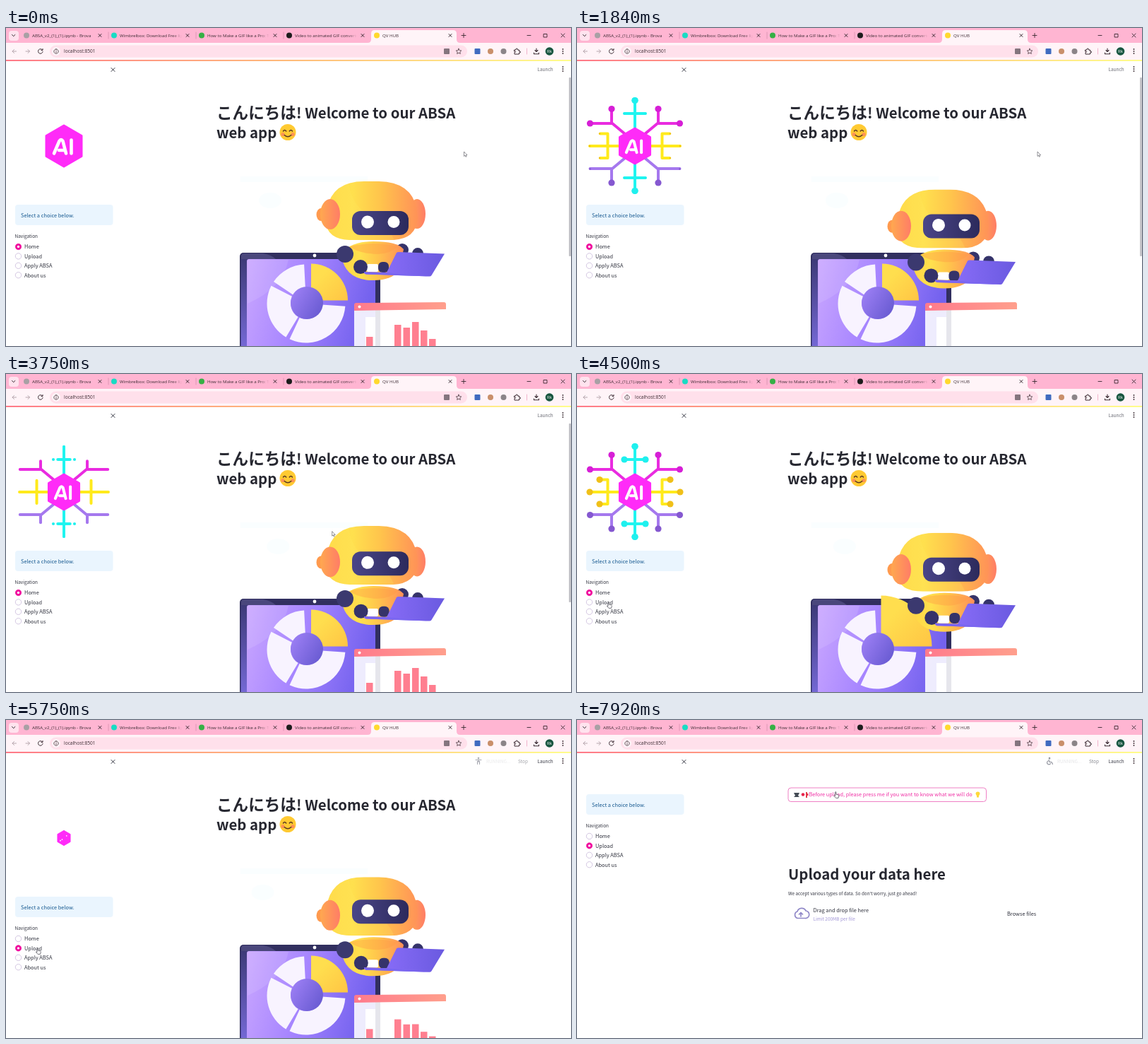
An HTML page that plays this animation: 800 by 450 pixels, repeating every 8000 ms.

```html
<!DOCTYPE html>
<html lang="en">
<head>
<meta charset="utf-8">
<title>Web app demo</title>
<style>
html, body { margin: 0; width: 100%; height: 100%; overflow: hidden; background: #fff; }
svg { display: block; width: 100vw; height: 100vh; }
.app { font: 7.4px "Noto Sans CJK JP", "Noto Sans CJK", "Noto Sans", sans-serif; fill: #31333f; }
.small { font-size: 6.45px; }
.h1 { font-size: 20.4px; font-weight: 700; fill: #262730; }
.ui { font: 6.15px "Open Sans", "Noto Sans", sans-serif; fill: #3a2b33; }
.line { fill: none; stroke-linecap: round; stroke-linejoin: round; }
</style>
</head>
<body>
<svg viewBox="0 0 800 450" xmlns="http://www.w3.org/2000/svg">
  <defs>
    <linearGradient id="rainbow"><stop stop-color="#ff6c7c"/><stop offset=".5" stop-color="#ffb46c"/><stop offset="1" stop-color="#fffd80"/></linearGradient>
    <linearGradient id="skin"><stop stop-color="#ffd644"/><stop offset=".3" stop-color="#ffe04e"/><stop offset=".58" stop-color="#ffc54c"/><stop offset="1" stop-color="#ff8f58"/></linearGradient>
    <linearGradient id="ear"><stop stop-color="#ffa850"/><stop offset="1" stop-color="#ff7d66"/></linearGradient>
    <linearGradient id="visor"><stop stop-color="#4a4588"/><stop offset="1" stop-color="#2c2a5c"/></linearGradient>
    <linearGradient id="bezel" x2="0" y2="1"><stop stop-color="#3d3a78"/><stop offset="1" stop-color="#7569d6"/></linearGradient>
    <linearGradient id="screen" x2="1" y2=".2"><stop stop-color="#c9a6ff"/><stop offset=".5" stop-color="#a584ff"/><stop offset="1" stop-color="#7462ee"/></linearGradient>
    <linearGradient id="slice" x2="1" y2="1"><stop offset=".3" stop-color="#ffde4e"/><stop offset="1" stop-color="#ffc544"/></linearGradient>
    <linearGradient id="lid"><stop stop-color="#9272ff"/><stop offset="1" stop-color="#6a5ae0"/></linearGradient>
    <linearGradient id="hub" x2="1" y2=".6"><stop stop-color="#a283f8"/><stop offset="1" stop-color="#6c5dd4"/></linearGradient>
    <linearGradient id="pink"><stop stop-color="#ff7a8c"/><stop offset="1" stop-color="#ff9f8c"/></linearGradient>
    <linearGradient id="fade"><stop stop-color="#ffb5d2" stop-opacity="0"/><stop offset="1" stop-color="#ffb5d2"/></linearGradient>
    <clipPath id="headClip"><path d="M453 275Q452 217 507 217H528Q582 218 583 270Q580 300 545 300H490Q455 300 453 275Z"/></clipPath>
  </defs>
  <rect width="800" height="450" fill="#fff"/>

  <g id="home">
    <text class="app h1" x="298" y="128"><tspan font-size="22.6">こんにちは</tspan>! Welcome to our ABSA</text>
    <text class="app h1" x="298" y="155.800">web app</text>
    <g transform="translate(399 147.500)">
      <circle r="11.500" fill="#ffca32"/>
      <circle cx="-7" cy="3" r="2.600" fill="#ff9256"/><circle cx="7" cy="3" r="2.600" fill="#ff9256"/>
      <path class="line" d="M-6.500-1.500q2-3 4.200 0M2.300-1.500q2.100-3 4.200 0M-4.800 4q4.800 4.600 9.600 0" stroke="#5b3a24" stroke-width="1.500"/>
    </g>
    <rect x="332" y="210" width="180" height="8" fill="#fafeff"/>
    <ellipse id="haze" cx="360" cy="250" rx="16" ry="11" fill="#fafeff"/>

    <rect x="331" y="318" width="199" height="150" rx="5" fill="#312f5f"/>
    <rect x="332.500" y="327" width="9" height="125" fill="url(#bezel)"/>
    <path d="M333 327v-4q0-4 4-4h27q12 2 18 8z" fill="#4a477c"/>
    <rect x="341" y="327" width="182" height="140" rx="3" fill="url(#screen)"/>
    <path d="M342 328h58q-8 40-58 62z" fill="#fff" opacity=".1"/>
    <circle cx="437" cy="322" r="2.400" fill="#fff"/>
    <g id="ring" fill="#f8f3ff"></g>
    <path id="wedge" fill="url(#slice)"/>
    <circle cx="426" cy="389" r="23" fill="url(#hub)"/>

    <g id="body">
      <circle cx="561" cy="314" r="9" fill="#35336a"/><circle cx="583" cy="319" r="8" fill="#35336a"/>
      <path d="M475 322Q484 302 520 302Q554 302 563 313L557 343Q546 357 520 357Q480 357 475 322Z" fill="url(#skin)"/>
      <path d="M487 309q30-8 68 0q-14 14-40 10q-20-2-28-10z" fill="#ff9a44" opacity=".4"/>
      <rect x="511" y="334" width="16" height="11" rx="2" fill="#fff"/>
      <circle cx="480" cy="320" r="12" fill="#3b396f"/>
      <g id="hands" fill="#35336a"><circle cx="502" cy="338" r="10"/><rect x="527" y="331" width="15" height="15" rx="6"/></g>
      <path d="M507 345l32 1 14-28q1-1 3-1l65 2.500-18.500 30.500q-1 1.500-3 1.500l-90-3q-3-1-2.500-3z" fill="url(#lid)"/>
      <path d="M539 346l61 5.500-90-3q-3-1-3-3.500z" fill="#7a66f0"/>
    </g>
    <g id="ears"><ellipse cx="582" cy="263" rx="12" ry="21" fill="url(#ear)"/></g>
    <g id="head" clip-path="url(#headClip)">
      <rect x="450" y="215" width="136" height="88" fill="url(#skin)"/>
      <path d="M450 215h35q2 30 22 45q32 12 44 43h-101z" fill="#ffe860" opacity=".22"/>
    </g>
    <g id="face">
      <rect x="490" y="259" width="80" height="34" rx="12" fill="url(#visor)"/>
      <circle cx="512" cy="274.500" r="9" fill="#fff"/><circle cx="549" cy="274.500" r="8.500" fill="#fff"/>
    </g>
    <g id="earFront">
      <ellipse cx="446" cy="264" rx="6.500" ry="9" fill="#ff9a4e"/>
      <ellipse cx="459" cy="263.500" rx="14" ry="21.500" fill="url(#ear)"/>
    </g>

    <rect x="493" y="398" width="129" height="60" fill="#fff" opacity=".88"/>
    <rect x="509" y="409" width="14" height="50" fill="#fff"/>
    <path d="M493 392q0-3 3-3l124-1q3 0 3 3v7l-130 2z" fill="url(#pink)"/>
    <circle cx="500.500" cy="394.500" r="2" fill="#fff"/>
    <g id="bars"></g>
  </g>

  <g id="upload" class="app">
    <rect id="button" x="299" y="96" width="280.500" height="19.500" rx="4" fill="#fff" stroke-width=".9"/>
    <path d="M307 103h8l-2 4 2 2h-8l2-2z" fill="#444b55"/><circle cx="320" cy="105.500" r="2.300" fill="#e8234c"/>
    <path d="M324 102h2v2h1.500v3H326v3h-2z" fill="#e23b4a"/>
    <text id="buttonText" x="328.500" y="108.300">Before upload, please press me if you want to know what we will do</text>
    <path d="M564.500 104.500a3 3 0 1 1 6 0l-1.500 3v2h-3v-2z" fill="#ffd83a"/>
    <text class="h1" x="299" y="225.500">Upload your data here</text>
    <text x="299" y="248" font-size="6.300">We accept various types of data. So don't worry, just go ahead!</text>
    <path class="line" d="M312 280.500a5 5 0 0 1 0-9.500a6.500 6.500 0 0 1 12-1a5 5 0 0 1-1 10.500zM317 278v-5m-2.500 2l2.500-2.500 2.500 2.500" stroke="#9088c8" stroke-width="1.700"/>
    <text x="334.500" y="271.500">Drag and drop file here</text>
    <text class="small" x="334.500" y="284" fill="#a095d6">Limit 200MB per file</text>
    <text x="609" y="277">Browse files</text>
  </g>

  <g id="logo">
    <g id="half"></g>
    <use href="#half" transform="translate(164 0) scale(-1 1)"/>
    <g id="hex">
      <path d="M0-29L25-14.500V14.500L0 29L-25 14.500V-14.500Z" fill="#ff2bf8" stroke="#ff2bf8" stroke-width="3" stroke-linejoin="round"/>
      <g id="letters" class="line" stroke="#fff" stroke-width="4.600">
        <path pathLength="1" d="M-14 10.500L-6.500-7Q-4-11-1.500-7L3 10.500"/><path pathLength="1" d="M-7 6H0"/><path pathLength="1" d="M10.500-8.500V10.500"/>
      </g>
    </g>
  </g>

  <g id="side" class="app">
    <rect x="13" y="250" width="138.500" height="29" rx="4" fill="#eaf5fe"/>
    <text x="21" y="267.500" fill="#17598f">Select a choice below.</text>
    <text class="small" x="12.500" y="296.500">Navigation</text>
    <g id="nav"></g>
  </g>

  <path class="line" d="M149 56.500l5 5m0-5l-5 5" stroke="#31333f" stroke-width="1"/>
  <g id="status" class="app small">
    <g id="runner" class="line" stroke="#8b8d98" stroke-width="1.100"></g>
    <text x="680" y="60.500" opacity=".14">RUNNING...</text>
    <text x="725" y="60.500" opacity=".6">Stop</text>
  </g>
  <text id="launch" class="app small" x="752.500" y="60.500">Launch</text>
  <rect id="scroll" x="797" y="70" width="3" height="253" rx="1" fill="#c4c4c9"/>

  <g id="chrome" class="ui"></g>

  <path id="arrow" d="M0 0v6.500l1.500-1.300 1 2.200 1-.5-.9-2.100h2z" fill="#fff" stroke="#4c4c55" stroke-width=".6"/>
  <path id="hand" d="M-1.500 1.500v-5.500q.8-1 1.500 0v3.200l3 .7q1 .3.800 1.500l-.8 3h-3.500l-2.600-3q0-1.200 1.600.1z" fill="#fff" stroke="#3c3c46" stroke-width=".7"/>
</svg>
<script>
const LOOP = 8000, FPS = 12;
const $ = id => document.getElementById(id);
const clamp = v => Math.max(0, Math.min(1, v));
const ramp = (t, a, b) => clamp((t - a) / (b - a));
const ease = v => v * v * (3 - 2 * v);
const mod = (a, b) => ((a % b) + b) % b;
const show = (id, on) => $(id).setAttribute('display', on ? 'inline' : 'none');
const move = (id, x, y, rest = '') => $(id).setAttribute('transform', `translate(${x} ${y}) ${rest}`);

// Piecewise linear value through [time, value] points.
function keys(t, list) {
  let i = 1;
  while (i < list.length - 1 && t > list[i][0]) i++;
  const [a, va] = list[i - 1], [b, vb] = list[i];
  return va + (vb - va) * ramp(t, a, b);
}

function sector(cx, cy, r, from, to, inner = 0) {
  const at = (rad, deg) => {
    const a = deg * Math.PI / 180;
    return `${(cx + rad * Math.cos(a)).toFixed(2)} ${(cy + rad * Math.sin(a)).toFixed(2)}`;
  };
  return `M${at(inner, from)}L${at(r, from)}A${r} ${r} 0 0 1 ${at(r, to)}L${at(inner, to)}` +
    (inner ? `A${inner} ${inner} 0 0 0 ${at(inner, from)}` : '') + 'Z';
}

function buildChrome() {
  const stroke = (d, c = '#3a2b33', w = 1) => `<path class="line" d="${d}" stroke="${c}" stroke-width="${w}"/>`;
  const dots = (x, y) => [-3, 0, 3].map(d => `<circle cx="${x}" cy="${y + d}" r=".9"/>`).join('');
  const tabs = [
    ['ABSA_v2_(1)_(1).ipynb - Brova', '#a8a0a4'],
    ['Wimbrelbox: Download Free light', '#19dcc4'],
    ['How to Make a GIF like a Pro: Tips', '#35b045'],
    ['Video to animated GIF converter', '#1c1c1c'],
    ['QV HUB', '#ffd92e']
  ];
  let s = `<rect width="800" height="22" fill="#ffb5d2"/><rect y="21" width="800" height="24" fill="#fff4f8"/>
    <path d="M512 21q5 0 5-5V8q0-5 5-5h111q5 0 5 5v8q0 5 5 5z" fill="#fff4f8"/>
    <rect y="45" width="800" height="1.800" fill="url(#rainbow)"/>
    <rect x="4" y="4" width="14" height="14" rx="4" fill="#ffe3ee"/>` + stroke('M8.500 9.500l2.200 2.200 2.200-2.200');
  tabs.forEach(([name, color], i) => {
    const x = 25 + i * 124;
    s += `<circle cx="${x + 4}" cy="10.500" r="4" fill="${color}"/>
      <svg x="${x + 12}" y="0" width="88" height="21"><text y="12.800">${name}</text>
      ${i % 4 ? '<rect x="74" width="14" height="21" fill="url(#fade)"/>' : ''}</svg>` +
      stroke(`M${x + 106} 8.500l4 4m0-4l-4 4`);
    if (i < 3) s += stroke(`M${x + 120} 6v9`, '#d690ae', .8);
  });
  s += stroke('M645 10.500h6m-3-3v6M738 10.500h5M761.500 8.500h4.500v4.500h-4.500zM786 8l5 5m0-5l-5 5', '#3a2b33', .9);
  s += stroke('M14.500 33h-5.500m2.500-2.500l-2.500 2.500 2.500 2.500M28 33h5.500m-2.500-2.500l2.500 2.500-2.500 2.500', '#b5a5ac');
  s += stroke('M51.500 31a3.300 3.300 0 1 0 .6 2.500M52 29.500v2h-2');
  s += `<rect x="62" y="24.500" width="591" height="17" rx="8.500" fill="#ffe0eb"/>
    <circle cx="71" cy="33" r="6" fill="#fff4f8"/>` + stroke('M71 29.800a3.200 3.200 0 1 0 .01 0M71 33v1.500M71 31.500v.1', '#3a2b33', .8);
  s += `<text x="82" y="35.400" font-size="6.600">localhost:8501</text>
    <rect x="620" y="29" width="8" height="8" rx="1" fill="#84757e"/>`;
  s += stroke('M641 29.200l1.100 2.500 2.700.3-2 1.800.5 2.700-2.300-1.400-2.300 1.400.5-2.700-2-1.800 2.700-.3z', '#4a3a42', .8);
  s += `<rect x="663.500" y="29" width="8" height="8" rx="1" fill="#3f6bc0"/>
    <circle cx="686" cy="33" r="4" fill="#c98f6a"/><circle cx="704.500" cy="33" r="4" fill="#8b8488"/>`;
  s += stroke('M720 31h2q-.5-2 1.200-2t1.200 2h2.100v2q2-.4 2 1t-2 1v2H720v-2.500q1.600-.2 1.600-1T720 33z');
  s += stroke('M737.500 29v8', '#f0b3cb') + stroke('M751 29v4.500m-2-2l2 2 2-2M747.500 35v1.800h7V35', '#3a2b33', 1.100);
  s += `<circle cx="769.500" cy="33" r="5.800" fill="#17553f"/><text x="769.500" y="35" text-anchor="middle" style="fill:#fff">Rk</text>`;
  $('chrome').innerHTML = s + dots(788.500, 33) + dots(788.500, 58);
}

// Left half of the circuit: path, colour, branch
const wires = [
  ['M82 150V102', '#1ff5f0', 0], ['M82 121H67', '#1ff5f0', 1], ['M82 184V231', '#1ff5f0', 0], ['M82 212H67', '#1ff5f0', 1],
  ['M68 150L50 135H18.5', '#e92be0', 0], ['M49 134.5V115', '#e92be0', 1],
  ['M68 184L50 199H18.5', '#a578ee', 0], ['M49 199.5V218', '#a578ee', 1],
  ['M62 167H18', '#ffea1c', 0], ['M43.5 167V149.5H33', '#ffea1c', 1], ['M43.5 167V184H33', '#ffea1c', 1]
];
// Node discs: x, y, colour, start of growth, start of shrinking
const nodes = [
  [82, 102.5, '#1ff0ee', 1.35, 2.42], [67, 121, '#1ff0ee', 1.05, 2.2],
  [82, 230.5, '#1ff0ee', 1.35, 2.42], [67, 212, '#1ff0ee', 1.05, 2.2],
  [18.5, 135, '#d61fd6', 1.38, 2.42], [49, 114.5, '#d61fd6', 1.38, 2.42],
  [18.5, 199.5, '#8558d0', 1.45, 2.2], [49, 219, '#8558d0', 1.38, 2.42],
  [18, 167, '#f0c018', 1.45, 2.2], [32, 149.5, '#f0c018', 1.45, 2.2], [32, 184, '#f0c018', 1.45, 2.2]
];
const options = ['Home', 'Upload', 'Apply ABSA', 'About us'];
const bars = [[510, 437], [550, 420], [562.5, 424], [575, 416], [587, 428], [599, 440]];

function build() {
  buildChrome();
  $('half').innerHTML =
    wires.map(([d, c]) => `<path class="line" pathLength="1" d="${d}" stroke="${c}" stroke-width="4"/>`).join('') +
    nodes.map(([x, y, c]) => `<circle cx="${x}" cy="${y}" fill="${c}"/>`).join('');
  $('nav').innerHTML = options.map((name, i) => {
    const y = 309.5 + i * 13.4;
    return `<circle cx="17.5" cy="${y}" r="4.2"/><circle cx="17.5" cy="${y}" r="1.7" fill="#fff"/><text x="26" y="${y + 2.9}">${name}</text>`;
  }).join('');
  $('ring').innerHTML = [[4, 115], [121, 207], [214, 267]]
    .map(([a, b]) => `<path d="${sector(425, 390, 55.5, a, b, 22)}"/>`).join('');
  $('bars').innerHTML = bars.map(([x]) => `<rect x="${x}" width="9.5"/>`).join('');
}

function trace(path, g) {
  path.setAttribute('stroke-dasharray', `${g} 2`);
  path.setAttribute('display', g > 0 ? 'inline' : 'none');
}

function drawLogo(u) {
  const size = keys(u, [[0, 0], [.1, .36], [.4, 1.04], [.55, 1], [.75, 1], [1.1, .87], [2.75, .87], [3.08, 0]]);
  move('hex', 82, 167, `scale(${size})`);
  [...$('letters').children].forEach((p, i) =>
    trace(p, Math.max(.01, ramp(u, .22 + i * .06, .48 + i * .035))));
  const parts = [...$('half').children];
  wires.forEach(([, , branch], i) => {
    const on = ease(ramp(u, .7 + branch * .25, 1.25 + branch * .15));
    trace(parts[i], on * (1 - ease(ramp(u, 2.6 - branch * .1, 2.9 - branch * .1))));
  });
  nodes.forEach(([, , , grow, shrink], i) =>
    parts[wires.length + i].setAttribute('r', 4.6 * ramp(u, grow, grow + .33) * (1 - ramp(u, shrink, shrink + .25))));
}

function drawRobot(t) {
  const L = 3.06, q = mod(t, L);
  const bob = 4.5 - 7.3 * Math.cos(2 * Math.PI * (t - .45) / L);
  const nod = keys(q, [[0, 0], [.84, 7], [1.84, 7], [2.69, 10], [2.94, 1], [L, 0]]);
  move('body', 0, bob);
  move('head', 0, bob);
  move('face', 0, bob - nod);
  move('ears', 0, bob + nod * .75);
  move('earFront', 0, bob + nod * .75);
  move('hands', .8 * Math.sin(t * 9), Math.sin(t * 11));
  move('haze', 14 + 12 * Math.sin(t * 2), -6);

  const w = mod(t, 2), pop = ease(ramp(w, .2, .45)) * (1 - ease(ramp(w, 1.15, 1.4)));
  $('wedge').setAttribute('d', sector(432 - 1.5 * pop, 385.5, 52 + 20 * pop, -90, 0));

  const fall = q > 2 ? 0 : .75;
  [...$('bars').children].forEach((bar, i) => {
    const grown = fall ? 1 - ease(ramp(q, fall + i * .05, 1.15 + i * .05))
      : ease(ramp(q, 2.42 + i * .035, 2.72 + i * .035));
    const h = (450 - bars[i][1]) * grown;
    const dark = i > 3 && q > 2.82 && q < 3.03;
    bar.setAttribute('y', 450 - h);
    bar.setAttribute('height', h);
    bar.setAttribute('fill', dark ? '#3f3a7a' : '#ff7f90');
  });
}

function drawSide(t, folded) {
  const picked = t >= 5.5 ? 1 : 0;
  move('side', 0, folded ? -145 : 0);
  const kids = $('nav').children;
  options.forEach((_, i) => {
    const on = i === picked, ring = kids[i * 3];
    ring.setAttribute('fill', on ? '#f0059c' : '#fff');
    ring.setAttribute('stroke', on ? '#f0059c' : '#cfc0de');
    ring.setAttribute('stroke-width', on ? .6 : .9);
    kids[i * 3 + 1].setAttribute('r', on ? 1.7 : 0);
  });
}

function drawCursor(t) {
  const out = ease(ramp(t, 3.5, 4.17)), back = ease(ramp(t, 6.65, 7.35));
  const hover = out === 1 && (back === 0 || back === 1);
  const x = 648.5 + 3.5 * ramp(t, 0, .3) - 606.5 * out + 321.5 * back;
  const y = 175 + 152 * out - 221 * back;
  move('arrow', x, y);
  move('hand', x, y);
  show('arrow', !hover);
  show('hand', hover);
}

function draw(t) {
  const swapped = t >= 6.33, rerun = t >= 7.7;
  const folded = (swapped && t < 6.83) || rerun;
  const running = (t >= 5.6 && t < 6.4) || rerun;
  show('home', !swapped);
  show('upload', swapped);
  show('logo', !folded);
  show('status', running);
  show('scroll', t < 3.9);
  if (!folded) drawLogo(t >= 6.83 ? t - 6.83 : mod(t + .55, 3.1));
  if (!swapped) drawRobot(t);
  drawSide(t, folded);
  drawCursor(t);

  const hot = t >= 7.3;
  $('button').setAttribute('stroke', hot ? '#ee72bf' : '#d6d2dc');
  $('buttonText').setAttribute('fill', hot ? '#ef2fa4' : '#31333f');
  $('launch').setAttribute('opacity', running ? 1 : .75);
  if (running) {
    const s = t - (rerun ? 7.7 : 5.6);
    $('status').setAttribute('opacity', .4 + .6 * ramp(s, .05, .22));
    $('runner').innerHTML = '<circle cx="669" cy="54.2" r=".8"/><path d="' + (rerun
      ? 'M668 56.5l1 3h3l1.5 3M667 58a2.6 2.6 0 1 0 3.5 3.5'
      : 'M665 56.5h8M669 56.5v3m-1.5 3v-4h3v4') + '"/>';
  }
}

build();
const start = performance.now();
function tick() {
  const ms = (performance.now() - start) % LOOP;
  draw(Math.floor(ms * FPS / 1000) / FPS);
  requestAnimationFrame(tick);
}
draw(0);
requestAnimationFrame(tick);
</script>
</body>
</html>
```
